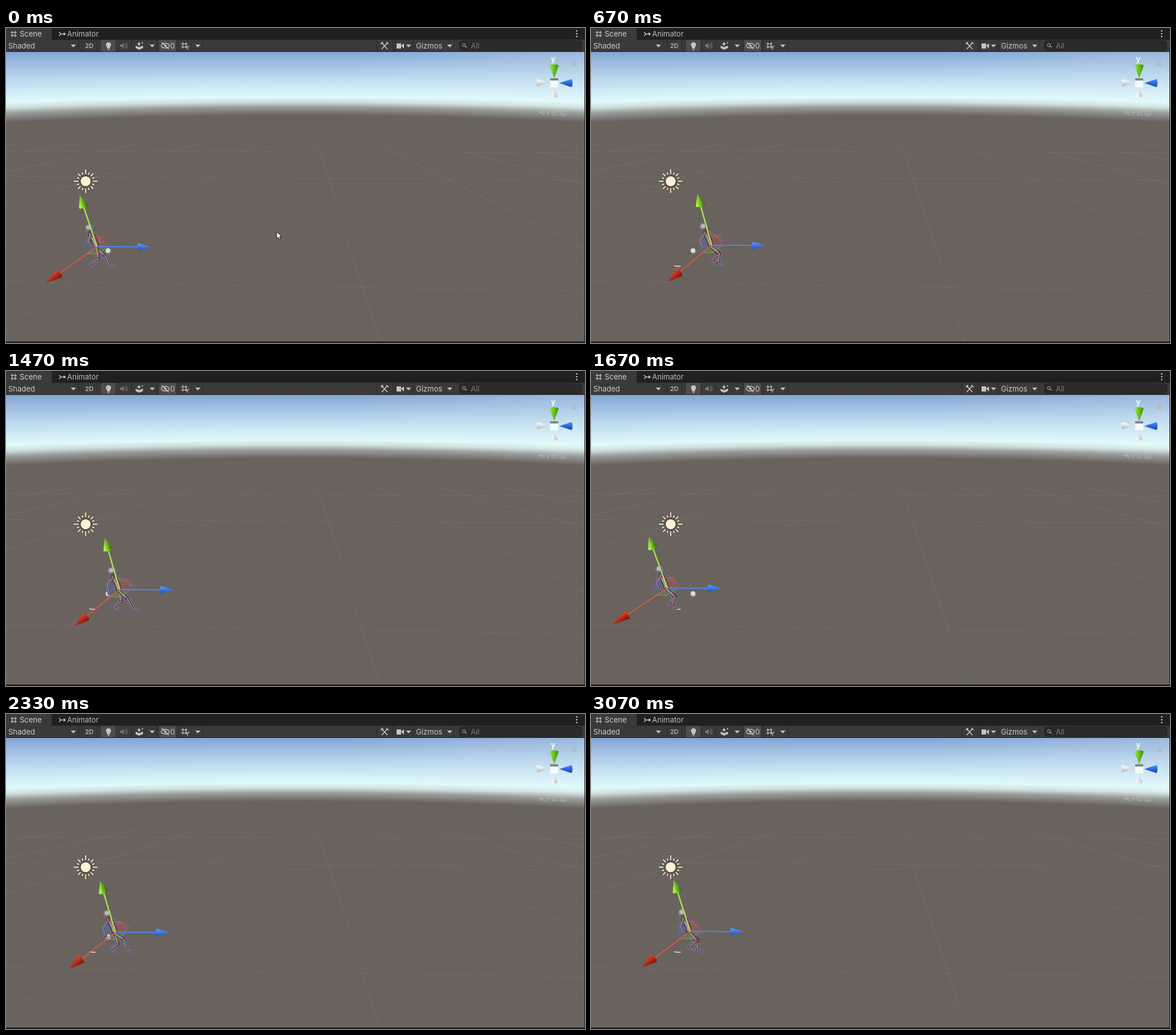
Write an HTML page with a canvas that moves like this. It is 1014x552 px and loops after 3.14 s.

```html
<!DOCTYPE html>
<html lang="en">
<head>
<meta charset="utf-8">
<title>Scene view</title>
<style>
html, body { margin: 0; width: 100%; height: 100%; overflow: hidden; background: #191919; }
canvas { display: block; }
</style>
</head>
<body>
<canvas id="stage" width="1014" height="552"></canvas>
<script>
const W = 1014, H = 552, LOOP = 3140, WALK = 965;
const stage = document.getElementById('stage').getContext('2d');
const backdrop = document.createElement('canvas');
backdrop.width = W;
backdrop.height = H;
let g = backdrop.getContext('2d');

function box(x, y, w, h, fill) {
  g.fillStyle = fill;
  g.fillRect(x, y, w, h);
}
function trace(points, close) {
  g.beginPath();
  points.forEach(([x, y]) => g.lineTo(x, y));
  if (close) g.closePath();
}
function poly(fill, ...points) {
  trace(points, true);
  g.fillStyle = fill;
  g.fill();
}
function line(color, width, ...points) {
  trace(points);
  g.strokeStyle = color;
  g.lineWidth = width;
  g.stroke();
}
function disc(x, y, r, fill) {
  g.beginPath();
  g.arc(x, y, r, 0, 7);
  g.fillStyle = fill;
  g.fill();
}
function label(text, x, y, size, color, weight = 400) {
  g.font = `${weight} ${size}px Inter, sans-serif`;
  g.fillStyle = color;
  g.fillText(text, x, y);
}
function gradient(x0, y0, x1, y1, ...stops) {
  const c = g.createLinearGradient(x0, y0, x1, y1);
  stops.forEach(([at, color]) => c.addColorStop(at, color));
  return c;
}
// Shaded from the clockwise side to the other, seen from the tip.
function cone([tx, ty], [bx, by], half, from, to) {
  const a = Math.atan2(by - ty, bx - tx), nx = -Math.sin(a) * half, ny = Math.cos(a) * half;
  g.beginPath();
  g.moveTo(tx, ty);
  g.lineTo(bx + nx, by + ny);
  g.ellipse(bx, by, half * .3, half, a, Math.PI / 2, -Math.PI / 2, true);
  g.closePath();
  g.fillStyle = gradient(bx + nx, by + ny, bx - nx, by - ny, [.2, from], [.9, to]);
  g.fill();
}

function drawSky() {
  box(0, 42, W, 508, '#69625d');
  for (let x = 0; x < W; x += 2) {
    const u = (x - 507) / 507, end = 153 + 13 * u * u;
    box(x, 42, 2, end - 42, gradient(0, 42, 0, end, [0, '#84a6d5'], [.35, '#b6d3ec'], [.6, '#d4eff7'],
      [.71, '#e0faf9'], [.79, '#cddedc'], [.87, '#999c9a'], [1, '#69625d']));
  }
  box(0, 42, W, 95, gradient(600, 0, W, 0, [0, 'rgba(235,248,250,0)'], [1, 'rgba(235,248,250,.22)']));
}

function drawGrid() {
  const vx = 525, vy = 140;
  const ink = alpha => `rgba(150,154,150,${alpha})`;
  const fade = (alpha, from) => gradient(0, from, 0, from + 90, [0, ink(0)], [1, ink(alpha)]);
  g.save();
  g.beginPath();
  g.rect(0, 155, W, 394);
  g.clip();
  for (let k = -60; k <= 60; k++) {
    const slope = .318 + .1664 * k;
    line(k % 10 ? fade(.07, 250) : fade(.23, 150), 1, [vx, vy], [vx + slope * 420, vy + 420]);
  }
  for (let k = -2; k < 26; k++) {
    const d = 1 / (.0032 + .00049 * k);
    line(ink(k % 10 ? Math.min(.08, d / 2800) : .2), 1, [0, vy + d * .972], [W, vy + d * 1.028]);
  }
  g.restore();
}

function drawSun() {
  const x = 139.5, y = 268.5;
  const rays = (color, width, extra) => {
    for (let i = 0; i < 16; i++) {
      const a = i * Math.PI / 8, c = Math.cos(a), s = Math.sin(a);
      const r = (i % 4 ? i % 2 ? 16.5 : 19 : 21) + extra;
      line(color, width, [x + c * (12.5 - extra), y + s * (12.5 - extra)], [x + c * r, y + s * r]);
    }
  };
  rays('rgba(45,40,32,.6)', 3.4, .6);
  disc(x, y, 10.2, '#3f3b36');
  rays('#fff1d6', 2, 0);
  disc(x, y, 8.8, '#fff0d2');
}

function drawAxisWidget() {
  cone([950, 96], [931, 96], 6.5, '#f4f6f6', '#b4bcbd');
  cone([960, 105], [960, 120], 6, '#f6f8f7', '#c4c6c4');
  cone([960, 88], [960, 66], 8, '#4fa012', '#8ee62c');
  cone([969, 96.5], [990, 96.5], 7, '#1f4fc0', '#4389ff');
  box(953, 88, 14, 5, '#7d8584');
  box(953, 92, 14, 12, '#f3fbfa');
  label('y', 954.5, 59, 13, '#fff', 600);
  label('z', 993, 100, 11, 'rgba(255,255,255,.45)');
  box(991.5, 62, 8, 5, 'rgba(190,180,165,.65)');
  line('rgba(180,170,160,.65)', 1, [993.5, 62], [993.5, 58], [997.5, 58], [997.5, 60]);
  line('#b4b2ae', 1.2, [944, 143.5], [934, 148], [944, 152.5]);
  line('#b4b2ae', 1.2, [934, 148], [945, 148]);
  label('Persp', 947, 152.5, 13, '#b5b3b0');
}

function hashIcon(x, y, size, color) {
  for (const f of [.25, .75]) {
    line(color, 1.2, [x + size * f, y], [x + size * f, y + size]);
    line(color, 1.2, [x, y + size * f], [x + size, y + size * f]);
  }
}
function caret(x) {
  poly('#c0c0c0', [x - 4.5, 29], [x + 4.5, 29], [x, 34]);
}
function button(x, w, fill) {
  box(x, 21, w, 20, fill);
  box(x - 1, 21, 1, 20, '#2b2b2b');
  box(x + w, 21, 1, 20, '#2b2b2b');
}

function drawToolbar() {
  const ink = '#c4c4c4', bar = '#3a3a3a', lit = '#4d4d4d';
  box(0, 0, W, 20, '#202020');
  box(0, 0, 80, 21, bar);
  box(0, 20, W, 22, bar);
  box(80, 20, W, 1, '#2b2b2b');
  box(0, 41, W, 1, '#282828');
  hashIcon(8, 5, 11, ink);
  label('Scene', 24, 15.3, 13, '#d0d0d0');
  line(ink, 1.3, [93, 7], [96, 10.5], [104, 10.5]);
  line(ink, 1.3, [93, 14], [96, 10.5]);
  poly(ink, [101, 7.5], [105, 10.5], [101, 13.5]);
  label('Animator', 107, 15.3, 13, '#bdbdbd');
  for (let y = 5; y <= 15; y += 5) disc(999.5, y, 1.3, '#d0d0d0');

  button(0, 127, bar);
  button(134, 25, bar);
  button(166, 26, lit);
  button(193, 26, bar);
  button(220, 44, bar);
  button(268, 30, lit);
  button(302, 42, bar);
  button(650, 27, bar);
  button(682, 29, bar);
  button(715, 69, bar);
  label('Shaded', 4, 35.7, 13, '#cacaca');
  [118, 256, 336, 705, 777].forEach(caret);
  label('2D', 138.5, 35, 11, ink, 500);

  disc(179.5, 29.5, 4.5, ink);
  box(177, 33, 5, 3, ink);
  box(178, 37, 3, 1.5, ink);
  poly('#777', [200, 29], [203, 29], [206, 26], [206, 36], [203, 33], [200, 33]);
  for (const r of [4, 7]) {
    g.beginPath();
    g.arc(205, 31, r, -.8, .8);
    g.strokeStyle = '#777';
    g.lineWidth = 1.2;
    g.stroke();
  }
  poly(ink, [227, 31], [233, 33.5], [240, 31], [240, 35], [233, 38], [227, 35]);
  poly(ink, [233, 24], [234.3, 27], [237, 28], [234.3, 29], [233, 32], [231.7, 29], [229, 28], [231.7, 27]);
  box(238, 25, 2, 2, ink);
  g.beginPath();
  g.ellipse(279, 31, 7, 4, 0, 0, 7);
  g.strokeStyle = ink;
  g.lineWidth = 1.4;
  g.stroke();
  disc(279, 31, 2, ink);
  line(ink, 1.5, [273, 25], [285, 37]);
  label('0', 287.5, 35.7, 13, ink);
  hashIcon(307, 25, 11, ink);
  line(ink, 1.2, [315, 31], [318, 34], [321, 31]);
  line(ink, 1.2, [318, 34], [318, 38]);

  line(ink, 1.6, [658, 26], [668, 37]);
  line(ink, 1.6, [668, 26], [658, 37]);
  line(ink, 2.6, [657, 28], [660, 25]);
  line(ink, 1.6, [666, 25], [670, 28]);
  box(684, 27, 8, 9, ink);
  poly(ink, [692, 31], [697, 27], [697, 36]);
  label('Gizmos', 718, 35.7, 13, '#cacaca');
  drawSearch('#212121');

  box(1013, 42, 1, 510, '#1b1b1b');
  box(0, 549.5, W, 3, '#1b1b1b');
}

function drawSearch(border) {
  g.beginPath();
  g.roundRect(794.5, 22.5, 214, 17, 4);
  g.fillStyle = '#2a2a2a';
  g.strokeStyle = border;
  g.lineWidth = 1;
  g.fill();
  g.stroke();
  g.beginPath();
  g.arc(802, 30, 2.6, 0, 7);
  g.strokeStyle = '#b0b0b0';
  g.stroke();
  line('#b0b0b0', 1.2, [804, 32], [807, 34]);
  label('All', 814, 35.5, 13, '#7b7b7b');
}

// Hips move forward and snap back once per cycle, bobbing on each step.
function hipAt(phase) {
  const u = (phase + 275) % WALK / WALK;
  return [131.8 + 81 * u ** .86, 381.7 + 1.4 * Math.cos(4 * Math.PI * phase / WALK)];
}

function drawFigure(x, y, phase) {
  const at = (px, py) => [x + px, y + py];
  const swing = 2 * Math.PI * phase / WALK, c = Math.cos(swing);
  const hip = at(0, 3), shoulder = at(-11, -22), [hx, hy] = at(-14, -32.5);
  const leg = angle => {
    const ax = 5.5 + 17 * Math.cos(angle), ay = 32 - 4 * Math.max(0, -Math.sin(angle));
    const dx = ax, dy = ay - 3, d = Math.hypot(dx, dy), bend = Math.sqrt(Math.max(9, 324 - d * d / 4));
    const knee = at(dx / 2 + dy / d * bend, 3 + dy / 2 - dx / d * bend);
    return [[7, hip, knee], [5, knee, at(ax, ay)], [4, at(ax, ay), at(ax + 8, ay + 3)]];
  };
  const limbs = [
    [4.5, shoulder, at(9 - 4 * c, -15), at(16 - 7 * c, -6)],
    ...leg(swing),
    [12, shoulder, at(-4, -9), at(-1, 0)],
    ...leg(swing + Math.PI),
    [5, shoulder, at(-18 + 3 * c, -7), at(-12 + 6 * c, 4 - 3 * c)],
  ];
  g.save();
  g.lineCap = g.lineJoin = 'round';
  limbs.forEach(([w, ...p]) => line('#6288c0', w + 2, ...p));
  disc(hx, hy, 7, '#6288c0');
  limbs.forEach(([w, ...p]) => {
    line('#583f48', w, ...p);
    line('#8d6261', w * .5, ...p);
    line('#c3a5a2', w * .18, ...p.map(([px, py]) => [px - w * .2, py - w * .1]));
  });
  disc(hx, hy, 5.8, '#7d5a58');
  disc(hx - 1, hy - 1, 4, '#c8b0aa');
  g.restore();
}

function drawHandles(x, y) {
  const lean = x - 160;
  const up = [-30 + lean * .1, -90], side = [94, .5], near = [-89 + lean * .25, 64];
  const along = ([dx, dy], f) => [x + dx * f, y + dy * f];
  const plane = (a, b, rgb, alpha) => {
    const p = along(a, .2), q = along(b, .2), far = [p[0] + q[0] - x, p[1] + q[1] - y];
    poly(`rgba(${rgb},${alpha})`, [x, y], p, far, q);
    line(`rgba(${rgb},.75)`, 1, [x, y], p, far, q, [x, y]);
  };
  plane(up, near, '70,115,200', .14);
  plane(up, side, '215,75,55', .26);
  plane(side, near, '120,190,70', .14);
  line('#e8593c', 1.7, [x, y], along(near, .8));
  line('#4a84ee', 2, [x, y], along(side, .8));
  line('#a6e552', 2.4, [x, y], along(up, .8));
  cone(along(near, 1), along(near, .74), 8, '#8a1a0e', '#e23c24');
  cone(along(side, 1), along(side, .77), 6.5, '#4f90ff', '#2a58c0');
  cone(along(up, 1), along(up, .78), 8.5, '#a4f83e', '#3d6c10');
}

// A flick to the upper right that slows sideways and leaves through the search field.
function drawPointer(t) {
  if (t > 600) return;
  const x = 838 - 364 * Math.max(0, 1 - t / 350) ** 1.4, y = 357 - .4816 * t - .00012 * t * t;
  const shape = [[0, 0], [0, 12], [2.8, 9.6], [4.8, 14], [7, 13], [5, 8.8], [8.8, 8.6]].map(([a, b]) => [x + a, y + b]);
  poly('#fff', ...shape);
  line('#111', 1, ...shape, shape[0]);
}

function draw(ms) {
  // The picture advances 15 times a second, on a 10 ms clock.
  const now = ms % LOOP, rest = now % 200;
  const t = Math.round(now - rest + (rest >= 130 ? 400 / 3 : rest >= 70 ? 200 / 3 : 0));
  const phase = t % WALK, [x, y] = hipAt(phase);
  g.drawImage(backdrop, 0, 0);
  drawFigure(x, y, phase);
  drawHandles(x, y);
  if (t === 600) drawSearch('#656565');
  drawPointer(t);
}

drawSky();
drawGrid();
drawSun();
drawAxisWidget();
drawToolbar();
line('#e4e2dd', 1.3, [146, 416.5], [150, 417.5], [157, 417.5]);
disc(179, 391, 5, '#85827f');
disc(178.6, 390, 4, '#dededd');

g = stage;
const start = performance.now();
function tick() {
  draw(performance.now() - start);
  requestAnimationFrame(tick);
}
tick();
</script>
</body>
</html>
```
